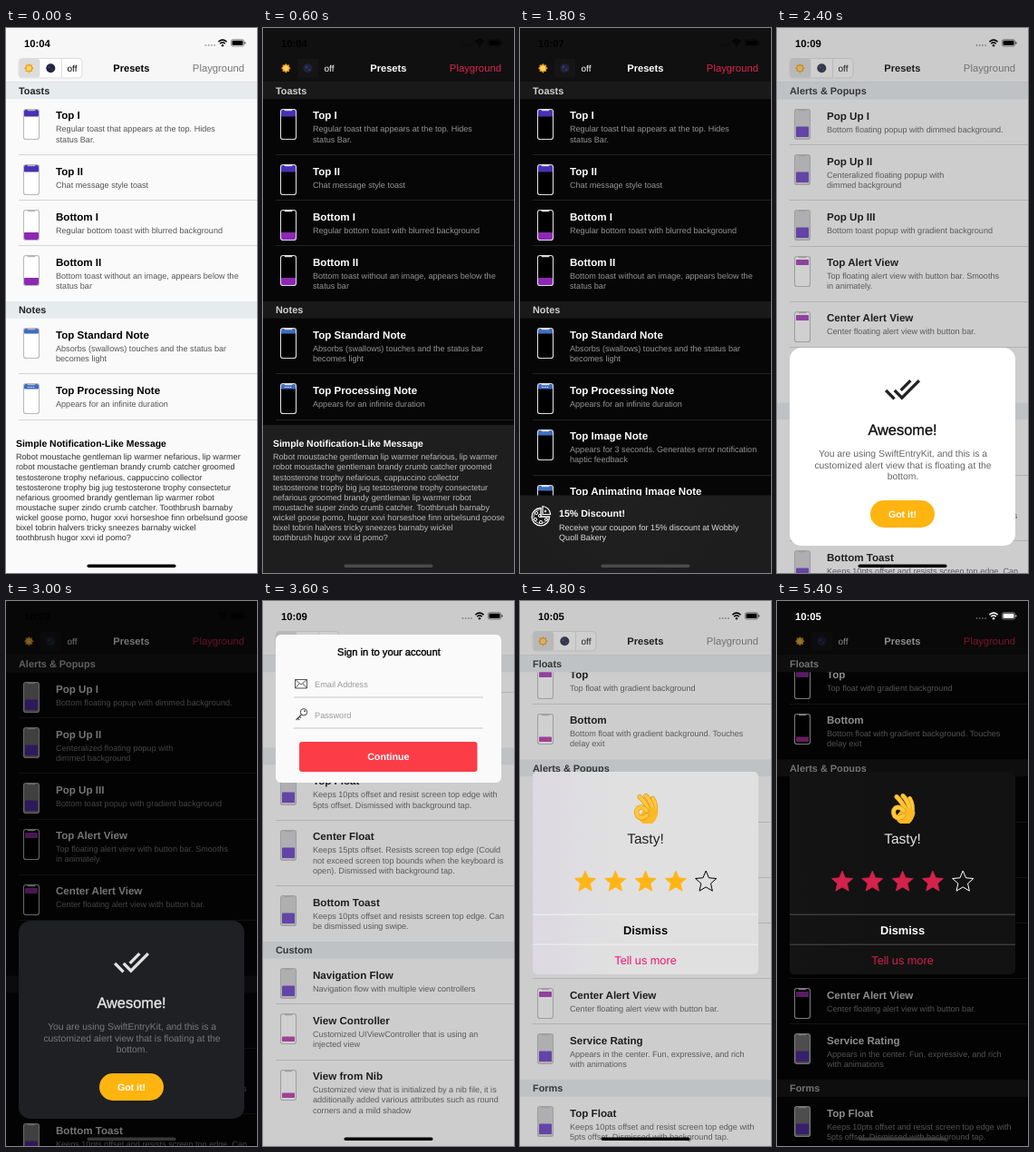
An HTML page for the animation above (6000 ms loop, 277 by 600 pixels).

```html
<!DOCTYPE html>
<html lang="en">
<head>
<meta charset="utf-8">
<title>Light and dark presets</title>
<style>
html, body { margin: 0; width: 100%; height: 100%; overflow: hidden; background: #000; }
svg { display: block; width: 100%; height: 100%; font-family: "Liberation Sans", Arial, sans-serif; text-rendering: geometricPrecision; }
text { fill: currentColor; white-space: pre; }
.medium { stroke: currentColor; stroke-width: .35; }
.bold { font-weight: bold; }
.middle { text-anchor: middle; }
.end { text-anchor: end; }
</style>
</head>
<body>
<svg id="stage" viewBox="0 0 277 600"></svg>
<script>
const HOLD = 600, NAV = 59.6, HEADER = 18.7;
const stage = document.getElementById('stage');

// Each row: title, thumbnail kind, description lines.
const topList = [
  ['Toasts', [
    ['Top I', 'toastTop', 'Regular toast that appears at the top. Hides', 'status Bar.'],
    ['Top II', 'toastTop', 'Chat message style toast'],
    ['Bottom I', 'toastBottom', 'Regular bottom toast with blurred background'],
    ['Bottom II', 'toastBottom', 'Bottom toast without an image, appears below the', 'status bar']]],
  ['Notes', [
    ['Top Standard Note', 'note', 'Absorbs (swallows) touches and the status bar', 'becomes light'],
    ['Top Processing Note', 'progress', 'Appears for an infinite duration'],
    ['Top Image Note', 'note', 'Appears for 3 seconds. Generates error notification', 'haptic feedback'],
    ['Top Animating Image Note', 'note', 'Appears with an animating image']]]
];
const lowerList = [
  ['Floats', [
    ['Top', 'barTop', 'Top float with gradient background'],
    ['Bottom', 'barBottom', 'Bottom float with gradient background. Touches', 'delay exit']]],
  ['Alerts &amp; Popups', [
    ['Pop Up I', 'popup', 'Bottom floating popup with dimmed background.'],
    ['Pop Up II', 'popup', 'Centeralized floating popup with', 'dimmed background'],
    ['Pop Up III', 'popup', 'Bottom toast popup with gradient background'],
    ['Top Alert View', 'barTop', 'Top floating alert view with button bar. Smooths', 'in animately.'],
    ['Center Alert View', 'barTop', 'Center floating alert view with button bar.'],
    ['Service Rating', 'popup', 'Appears in the center. Fun, expressive, and rich', 'with animations']]],
  ['Forms', [
    ['Top Float', 'popup', 'Keeps 10pts offset and resist screen top edge with', '5pts offset. Dismissed with background tap.'],
    ['Center Float', 'popup', 'Keeps 15pts offset. Resists screen top edge (Could', 'not exceed screen top bounds when the keyboard is', 'open). Dismissed with background tap.'],
    ['Bottom Toast', 'popup', 'Keeps 10pts offset and resists screen top edge. Can', 'be dismissed using swipe.']]],
  ['Custom', [
    ['Navigation Flow', 'popup', 'Navigation flow with multiple view controllers'],
    ['View Controller', 'barBottom', 'Customized UIViewController that is using an', 'injected view'],
    ['View from Nib', 'barBottom', 'Customized view that is initialized by a nib file, it is', 'additionally added various attributes such as round', 'corners and a mild shadow']]]
];

const light = {
  dark: false, bg: '#fafafa', nav: '#f7f7f8', header: '#e6ebed', line: '#d4d4d6', ink: '#000', sub: '#555',
  link: '#777', phone: '#fff', edge: '#b8b8ba', screen: '#d0d0d2', seg: '#dcdcde', segEdge: '#d6d6d8',
  accent: '#ffb515', more: '#ec1470', headerInk: '#222'
};
const dark = {
  dark: true, bg: '#060606', nav: '#101010', header: '#191919', line: '#222', ink: '#fff', sub: '#949494',
  link: '#dc2450', phone: '#000', edge: '#dcdcdc', screen: '#8c8c8c', seg: '#151515', segEdge: 'none',
  accent: '#d4224b', more: '#d4224b', headerInk: '#d0d0d0'
};

const text = (x, y, s, size, color, cls = '') =>
  `<text x="${x}" y="${y}" font-size="${size}" color="${color}" class="${cls}">${s}</text>`;
const rect = (x, y, w, h, fill, r = 0, extra = '') =>
  `<rect x="${x}" y="${y}" width="${w}" height="${h}" rx="${r}" fill="${fill}" ${extra}/>`;
const circle = (x, y, r, fill, extra = '') =>
  `<circle cx="${x}" cy="${y}" r="${r}" fill="${fill}" ${extra}/>`;
const stroke = (d, color, width, extra = '') =>
  `<path d="${d}" fill="none" stroke="${color}" stroke-width="${width}" ${extra}/>`;
const lines = (x, y, pitch, list, size, color, cls) =>
  list.map((s, i) => text(x, y + i * pitch, s, size, color, cls)).join('');

function star(x, y, outer, inner, points, fill, extra = '') {
  const corners = Array.from({ length: points * 2 }, (_, i) => {
    const r = i % 2 ? inner : outer, a = i * Math.PI / points - Math.PI / 2;
    return `${(x + r * Math.cos(a)).toFixed(2)},${(y + r * Math.sin(a)).toFixed(2)}`;
  });
  return `<polygon points="${corners.join(' ')}" fill="${fill}" stroke-linejoin="round" ${extra}/>`;
}

// Band of each kind: top, height, side inset, colour.
const bands = {
  toastTop: [1, 7.5, 1, '#4930b4'], toastBottom: [25, 8, 1, '#8c28b4'],
  note: [1, 5.5, 1, '#3f6cc2'], progress: [1, 5.5, 1, '#3f6cc2'],
  barTop: [4, 6, 2, '#a035b4'], barBottom: [25.5, 5.5, 2, '#b832a8'], popup: [19.5, 11.5, 2, '#6238c4']
};

function phone(y, kind, c) {
  const [top, height, inset, color] = bands[kind];
  return rect(19.5, y + .5, 17, 33, kind === 'popup' ? c.screen : c.phone, 2.6) +
    rect(19 + inset, y + top, 18 - 2 * inset, height, color, .8) +
    (kind === 'progress' ? stroke(`M24 ${y + 4.5}h8`, '#fff', 1, 'stroke-dasharray="1 1"') : '') +
    rect(19.5, y + .5, 17, 33, 'none', 2.6, `stroke="${c.edge}" stroke-width="1.1"`) +
    rect(23.5, y + .3, 9, 2, c.edge, 1);
}

function row(y, [title, kind, ...about], c) {
  return phone(Math.round(y + 10.5), kind, c) + text(55, y + 22, title, 11.6, c.ink, 'bold') +
    lines(55, y + 36, 11.3, about, 9.1, c.sub);
}

function list(sections, y, c) {
  let rows = '', headers = '';
  for (const [name, items] of sections) {
    const top = Math.max(NAV, y);
    headers += rect(0, top, 277, HEADER, c.header) +
      text(14, top + 13.3, name, 10.9, c.headerInk, 'bold');
    y += HEADER;
    items.forEach((item, i) => {
      rows += row(y, item, c);
      y += 50.1 + (item.length - 3) * 11.15;
      if (i < items.length - 1) rows += rect(14, Math.floor(y), 263, 1, c.line);
    });
    if (y < NAV) headers = '';
  }
  return rows + headers;
}

function navBar(c) {
  return rect(0, 0, 277, NAV, c.nav) + rect(0, NAV - .6, 277, .6, c.line) +
    rect(14, 33.5, 70, 21.5, c.dark ? 'none' : '#fdfdfd', 4, `stroke="${c.segEdge}" stroke-width=".8"`) +
    rect(c.dark ? 38 : 14.4, 34, 23, 20.5, c.seg, c.dark ? 0 : 3) +
    (c.dark ? '' : rect(61, 34, .8, 20.5, c.segEdge)) +
    star(25.3, 44.3, 5.4, 3.8, 8, '#f39a1e') + circle(25.3, 44.3, 2.9, '#ffd75c') +
    circle(49.3, 44.3, 5, '#20243f') + circle(47.8, 43, 1.3, '#3a3f60') + circle(51, 46, 1, '#343958') +
    text(73, 47.7, 'off', 10, c.ink, 'middle') +
    text(138.3, 48.2, 'Presets', 11.1, c.ink, 'bold middle') +
    text(263, 48.2, 'Playground', 11.3, c.link, 'end');
}

function statusBar(time, color) {
  const dots = [220.5, 223.7, 226.9, 230.1].map(x => circle(x, 19, .9, color, 'opacity=".35"')).join('');
  return text(20, 20.6, time, 11.3, color, 'bold') + dots +
    stroke('M234.4 15.2Q239 11 243.6 15.2M236.2 17.3Q239 14.8 241.8 17.3', color, 1.5) +
    circle(239, 19.2, 1.2, color) +
    rect(248.4, 12.7, 14.2, 7.4, 'none', 2, `stroke="${color}" stroke-width=".7" opacity=".6"`) +
    rect(249.5, 13.8, 12, 5.2, color, 1.1) + rect(263.4, 15.2, .9, 2.5, color, .4);
}

function messageToast(c) {
  return rect(0, 437, 277, 163, c.dark ? '#1e1e1f' : '#fafafb') +
    text(11, 460.6, 'Simple Notification-Like Message', 10.45, c.ink, 'bold') +
    lines(11, 475.2, 11.15, [
      'Robot moustache gentleman lip warmer nefarious, lip warmer',
      'robot moustache gentleman brandy crumb catcher groomed',
      'testosterone trophy nefarious, cappuccino collector',
      'testosterone trophy big jug testosterone trophy consectetur',
      'nefarious groomed brandy gentleman lip warmer robot',
      'moustache super zindo crumb catcher. Toothbrush barnaby',
      'wickel goose pomo, hugor xxvi horseshoe finn orbelsund goose',
      'bixel tobrin halvers tricky sneezes barnaby wickel',
      'toothbrush hugor xxvi id pomo?'
    ], 9.1, c.dark ? '#bbb' : '#333');
}

function discountToast(c) {
  const toppings = [[18, 534], [17, 541], [23, 544], [29, 541], [22, 537]]
    .map(([x, y]) => circle(x, y, 1.6, 'none', `stroke="${c.ink}" stroke-width="1"`)).join('');
  return `<radialGradient id="glow" gradientUnits="userSpaceOnUse" cx="120" cy="518" r="120">
      <stop stop-color="${c.dark ? '#202020' : '#e5e5e5'}"/><stop offset="1" stop-color="${c.dark ? '#1d1d1d' : '#f7f7f7'}"/>
    </radialGradient>` +
    rect(0, 514.5, 277, 86, 'url(#glow)') +
    stroke('M23 528.5A9.7 9.7 0 1 0 32.5 538L23 538Z', c.ink, 1.3) +
    stroke('M21.5 530.5A7.6 7.6 0 1 0 30 540', c.ink, .7) +
    stroke('M25 535.5V526.5A9.5 9.5 0 0 1 33.6 535.5Z', c.ink, 1.2) + circle(28, 532, 1.2, c.ink) + toppings +
    text(43, 538.4, '15% Discount!', 10.6, c.ink, 'bold') +
    lines(43, 553.2, 11.2, ['Receive your coupon for 15% discount at Wobbly', 'Quoll Bakery'], 9.1, c.dark ? '#ddd' : '#222');
}

function awesomePopup(c) {
  return rect(14, 352, 249, 218, c.dark ? '#1e2024' : '#fff', 13) +
    `<g transform="translate(118.3 377.6) scale(1.68)">` +
    stroke('M6.8 12.7L11.66 17.6L22.95 6.3M1.1 12.7L6.7 18.3M10.95 12.65L17.3 6.3', c.dark ? '#e2e2e2' : '#222', 2) + '</g>' +
    text(138.5, 447.6, 'Awesome!', 16.4, c.dark ? '#e8e8e8' : '#111', 'medium middle') +
    lines(139, 471.8, 12.7, ['You are using SwiftEntryKit, and this is a',
      'customized alert view that is floating at the', 'bottom.'], 10.4, c.dark ? '#787878' : '#666', 'middle') +
    rect(103, 520, 71, 30, '#ffb410', 15) + text(138.5, 538.8, 'Got it!', 10.6, '#fff', 'bold middle');
}

function signInForm(c) {
  const icon = c.dark ? '#ddd' : '#444', rule = c.dark ? '#777' : '#bbb', hint = c.dark ? '#6c6c6c' : '#999';
  return rect(14, 37, 249, 163, c.dark ? '#151516' : '#fafafa', 6) +
    text(139, 60.4, 'Sign in to your account', 11.2, c.ink, 'medium middle') +
    stroke('M35.5 86.5h13v9.5h-13zl6.5 5.5l6.5 -5.5M35.5 96l4.6 -5M48.5 96l-4.6 -5', icon, .9) +
    text(57, 94.6, 'Email Address', 9.2, hint) + rect(34, 105.6, 209, .8, rule) +
    circle(45, 122.3, 3.7, 'none', `stroke="${icon}" stroke-width="1"`) + circle(46, 121.2, .9, icon) +
    stroke('M42.4 125L36.5 131M38.3 129.2l1.8 1.8M40.2 127.2l1.6 1.6', icon, 1.1) +
    text(57, 129.2, 'Password', 9.2, hint) + rect(34, 139.6, 209, .8, rule) +
    rect(40, 155, 196.5, 33, '#fc3d47', 3) + text(138.3, 175.3, 'Continue', 10.7, '#fff', 'bold middle');
}

function okHand() {
  const round = 'stroke-linecap="round" stroke-linejoin="round"';
  const outlined = d => stroke(d, '#d98a12', 5.2, round) + stroke(d, '#ffc83a', 4.2, round);
  return outlined('M149 233Q150.5 224 146.5 217.5') + outlined('M147 232Q145 220 139 214.5') +
    outlined('M143 232Q139 222 132 215.5') +
    '<path d="M139 228Q150 225 152.5 233Q151 241 146 245H136Q131 242 131 237Z" fill="#fbb928"/>' +
    outlined('M140 231Q135 225.5 130.5 228Q127 231.5 130 237Q134.5 241 140 236');
}

function ratingPopup(c) {
  const rule = c.dark ? '#555' : '#f2f2f2';
  const stars = [72, 105.3, 138.6, 171.9, 205.2].map((x, i) => i < 4
    ? star(x, 309.3, 12.2, 5.6, 5, c.accent, `stroke="${c.accent}" stroke-width=".8"`)
    : star(x, 309.3, 12.2, 5.6, 5, 'none', `stroke="${c.ink}" stroke-width="1"`)).join('');
  return `<linearGradient id="card"><stop stop-color="${c.dark ? '#141415' : '#dcd9e2'}"/>
      <stop offset=".35" stop-color="${c.dark ? '#121213' : '#e0e0e0'}"/></linearGradient>` +
    rect(14, 188, 249, 223, 'url(#card)', 5) + okHand() +
    text(138.5, 267, 'Tasty!', 15.5, c.dark ? '#e4e4e4' : '#222', 'middle') + stars +
    rect(14, 344.7, 249, .9, rule) + rect(14, 377.7, 249, .9, rule) +
    text(138.5, 366.5, 'Dismiss', 12.8, c.ink, 'bold middle') +
    text(138.5, 400, 'Tell us more', 12.7, c.more, 'middle');
}

// dim: strength of the dark veil; status and home: their colours in dark mode.
const scenes = [
  { time: '10:04', rows: topList, top: NAV, entry: messageToast, status: '#020202', home: '#4a4a4a' },
  { time: '10:07', rows: topList, top: NAV, entry: discountToast, status: '#020202', home: '#4a4a4a' },
  { time: '10:09', rows: lowerList, top: -70.2, entry: awesomePopup, dim: .54, status: '#020202', home: '#383838' },
  { time: '10:09', rows: lowerList, top: -321.3, entry: signInForm, dim: .55, status: '#fff', home: '#fff' },
  { time: '10:05', rows: lowerList, top: 44.3, entry: ratingPopup, dim: .45, status: '#fff', home: '#3a3a3a' }
];

function draw(scene, c) {
  const veil = c.dark ? `rgba(0,0,0,${scene.dim})` : 'rgba(100,100,100,.3)';
  return rect(0, 0, 277, 600, c.bg) + list(scene.rows, scene.top, c) + navBar(c) +
    (scene.dim ? rect(0, 0, 277, 600, veil) : '') +
    scene.entry(c) + statusBar(scene.time, c.dark ? scene.status : '#000') +
    rect(89.5, 590.4, 98, 3.6, c.dark ? scene.home : '#000', 1.8);
}

let shown = -1;
function tick() {
  const step = Math.floor(performance.now() / HOLD) % (scenes.length * 2);
  if (step !== shown) {
    shown = step;
    stage.innerHTML = draw(scenes[step >> 1], step % 2 ? dark : light);
  }
  requestAnimationFrame(tick);
}
tick();
</script>
</body>
</html>
```
